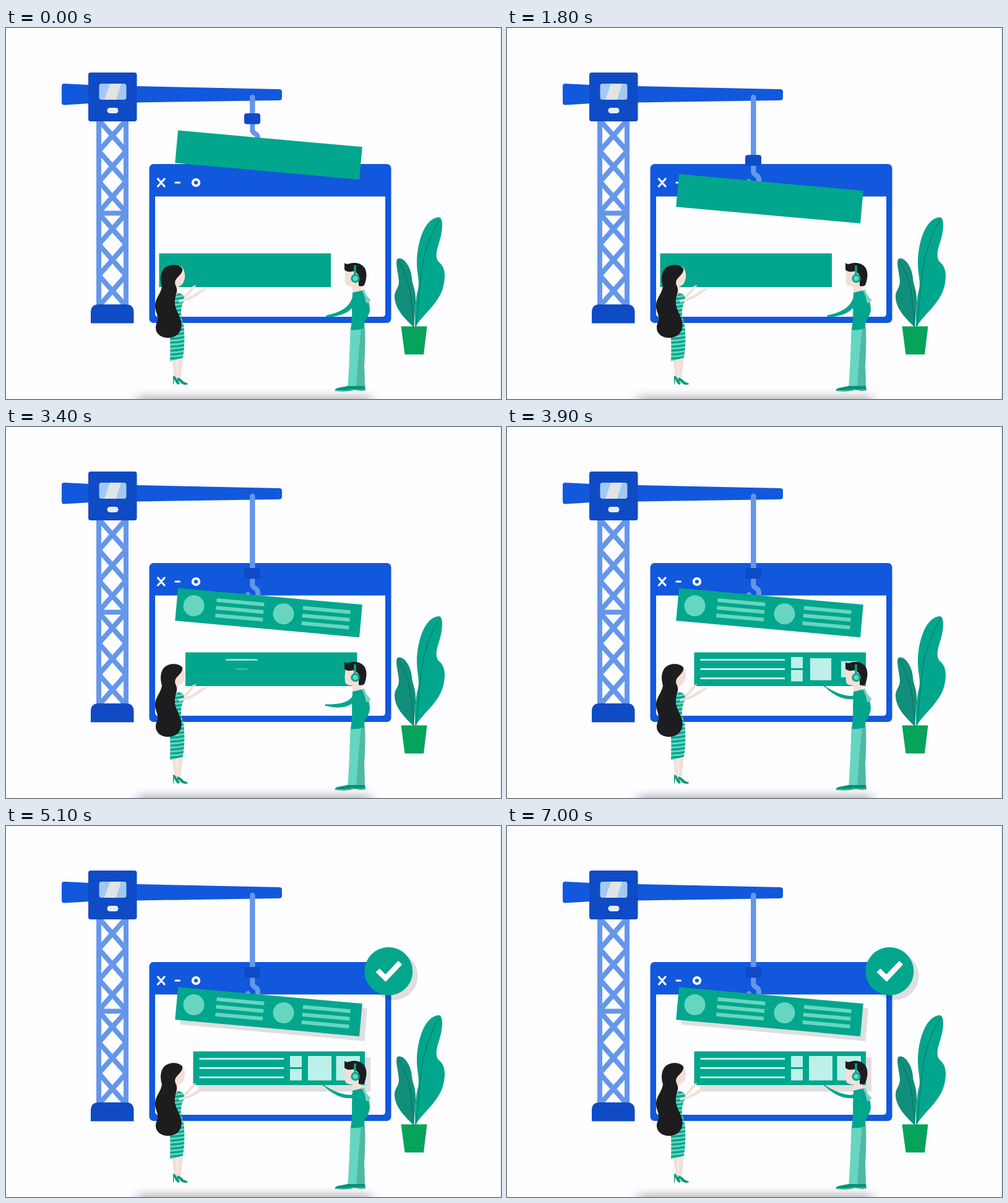
These frames come from a looping animation (800 by 600 pixels, 7100 ms). An HTML page:

```html
<!DOCTYPE html>
<html lang="en">
<head>
<meta charset="utf-8">
<title>Building a page</title>
<style>
  html, body { margin: 0; width: 100%; height: 100%; overflow: hidden; background: #fefdff; }
  svg { display: block; width: 100vw; height: 100vh; }
  .blue { fill: #1158dd; }
  .navy { fill: #0f4bc5; }
  .green { fill: #02a68c; }
  .mint { fill: #66d6c0; }
  .pale { fill: #bdf0e8; }
  .skin { fill: #f3dfd8; }
  .ink { fill: #1d1c1e; }
  .line { fill: none; stroke-linecap: round; stroke-linejoin: round; }
  .shade { fill: #000; fill-opacity: .12; }
</style>
</head>
<body>
<svg viewBox="0 0 800 600" xmlns="http://www.w3.org/2000/svg">
  <defs>
    <filter id="soft" x="-20%" y="-150%" width="140%" height="400%"><feGaussianBlur stdDeviation="9 7"/></filter>
    <clipPath id="dress">
      <path d="M272 429Q281 427 287 433Q289 440 285 447Q282 455 283 465L287 480Q290 505 286 533Q276 536 265 539Q266 520 265 500V470Z"/>
    </clipPath>
    <clipPath id="pane"><rect x="150.5" y="90" width="44" height="26" rx="4"/></clipPath>
  </defs>
  <rect width="800" height="600" fill="#fefdff"/>
  <rect x="212" y="595" width="378" height="22" fill="#777" opacity=".5" filter="url(#soft)"/>
  <rect x="799" width="1" height="600" fill="#e2e1e4"/>

  <!-- tower -->
  <g id="tower" class="line" stroke="#6596ea" stroke-width="8" style="stroke-linecap:butt"></g>
  <path class="navy" d="M137 477.5V460Q137 447 150 447H193.500Q206.500 447 206.500 460V477.5Z"/>
  <path class="blue" d="M94 90L135 92V122L94 124.500Q90 124.500 90 120V94Q90 90 94 90Z"/>
  <path class="blue" d="M210 94L441 99Q446 99 446 103V113Q446 117 441 117L210 120.500Z"/>
  <rect class="navy" x="133" y="72" width="78.5" height="79" rx="4"/>
  <g clip-path="url(#pane)">
    <rect x="150" y="90" width="45" height="26" fill="#a2c9f1"/>
    <path d="M168 90H186L178 116H159Z" fill="#dfe4e7"/>
  </g>
  <rect x="163.500" y="129" width="18" height="9" rx="4.500" fill="#e5effd"/>

  <!-- browser window -->
  <rect class="blue" x="231.500" y="220" width="391" height="257" rx="7"/>
  <path d="M241 272.500H613V462Q613 467 608 467H246Q241 467 241 462Z" fill="#fefdff"/>
  <g class="line" stroke="#fff" stroke-width="3.200">
    <path d="M245.500 244L256 256M256 244L245.500 256M274 250H280.500"/>
    <ellipse cx="307" cy="250" rx="5.200" ry="5" stroke-width="4"/>
  </g>

  <!-- hook, drawn in its lowered place -->
  <path id="cable" class="line" stroke="#6596ea" stroke-width="8.500"/>
  <g id="hook">
    <path class="line" stroke="#6596ea" stroke-width="8" d="M398.300 240V256Q399 259 403 261Q408 264 407 271Q405 281 397 280Q390 279 391 271"/>
    <rect class="navy" x="385" y="228" width="26" height="17.500" rx="4"/>
  </g>

  <g id="banner">
    <rect class="shade fall" x="9" y="7" width="299" height="53"/>
    <rect class="green" width="299" height="53"/>
    <g id="cards"></g>
  </g>

  <rect class="shade fall" x="311.500" y="374" width="277.500" height="55.500"/>
  <rect id="panel" class="green" y="364.500" width="277.500" height="54.500"/>
  <g id="parts"></g>

  <circle class="shade fall" cx="626.500" cy="242.500" r="39"/>
  <g id="badge">
    <circle class="green" cx="618.300" cy="235" r="39"/>
    <path d="M600.500 233.500L613.500 246L637 221" fill="none" stroke="#fff" stroke-width="8.500"/>
  </g>

  <!-- plant -->
  <path fill="#118e7c" d="M659 484C646 471 628 455 628 434C628 424 635 421 635 410C634 395 628 378 633 373C642 369 655 386 656 405C657 418 663 422 662 445Z"/>
  <path class="green" d="M661 484C661 460 661 440 666 422C669 410 664 398 664 380C664 348 676 308 699 306C708 306 706 330 699 350C695 362 694 372 699 378C706 384 709 390 709 402C708 425 700 436 690 449C679 462 670 470 661 484Z"/>
  <path class="line" stroke="#0c6c60" stroke-width=".9" d="M634 375Q653 410 655 440L659 482M701 309Q678 345 671 395L663 482"/>
  <path d="M638.500 482.500H680.500L675 528H644.500Z" fill="#06a35a"/>

  <!-- woman -->
  <path class="skin" d="M268 534H276L277 566L273 569ZM277 533H286L282 568L278 570Z"/>
  <path fill="#0b9a7a" d="M270 562Q274 563 277 569L281 575L278 577Q273 573 272 567L271 577L270 576ZM277 565Q283 567 287 572L294 575Q294 577 289 577Q283 576 279 570L278 577L277 576Z"/>
  <path class="line" stroke="#f3dfd8" stroke-width="4" d="M280 440Q288 436 294 430L303 419"/>
  <path class="line" stroke="#f3dfd8" stroke-width="1.800" d="M301 421L306 416.500"/>
  <g clip-path="url(#dress)">
    <rect class="mint" x="255" y="425" width="40" height="120"/>
    <g id="stripes" stroke="#02a68c" stroke-width="3.300"></g>
  </g>
  <path class="skin" d="M279 440Q294 437 302 432Q312 424 325 419.500Q327 421 317 427Q304 439 280 444Z"/>
  <path class="skin" d="M270 386H284Q290 393 289 404Q287 416 279 418L276 432H266Z"/>
  <path class="ink" d="M285 389C279 381 261 381 254 391C248 400 250 411 252 418C250 431 240 438 241 451C242 462 248 467 244 476C238 489 246 500 259 501C277 502 286 490 283 474C280 462 271 452 273 440C274 430 278 427 275 418C267 404 287 401 285 389Z"/>

  <!-- man -->
  <path class="green" d="M579 428Q588 440 588 457Q586 468 578 476L576 468Q583 460 581 452Z"/>
  <path class="mint" d="M556.500 488L580 484Q581 510 579 545L580 583H552Q555 545 556.500 488Z"/>
  <path fill="#4fb9a4" d="M574 486L580 484Q581 510 579 545L580 583H566Q569 530 574 486Z"/>
  <path fill="#07907a" d="M532 587Q531 583 537 582L552 579H580L581 586Q572 588 563 585Q553 589 532 587Z"/>
  <path d="M533 586Q550 588 562 584M566 585H580" fill="none" stroke="#66d6c0" stroke-width="1"/>
  <path class="skin" d="M549 390Q546 408 549 415Q555 419 560 418V428L574 425V392Z"/>
  <path class="ink" d="M547 380Q550 383 555 381Q570 377 579 387Q586 398 579 416Q575 419 570 417V400L564 393Q551 396 547 391Z"/>
  <path class="green" d="M560 428L577 424Q583 432 584 444Q584 458 580 468L579 485Q567 490 557 488Q560 468 559 452Z"/>
  <path fill="#7fd0bf" d="M575 424L579 423Q582 434 589 439Q589 444 582 445Q580 433 575 424Z"/>
  <path id="arm" class="green"/>
  <path class="line" stroke="#02a68c" stroke-width="3.500" d="M564 384V402" style="stroke-linecap:butt"/>
  <circle class="green" cx="564.500" cy="405" r="7.200"/>
  <circle class="mint" cx="564.500" cy="405" r="4"/>
</svg>
<script>
const LOOP = 7100;
const $ = id => document.getElementById(id);
const clamp = v => Math.max(0, Math.min(1, v));
const out = t => 1 - (1 - t) ** 3;
const inOut = t => t < .5 ? 4 * t ** 3 : 1 - (2 - 2 * t) ** 3 / 2;
const quad = t => t < .5 ? 2 * t * t : 1 - 2 * (1 - t) ** 2;
const span = (t, start, length, ease) => ease(clamp((t - start) / length));
const mix = (a, b, k) => a + (b - a) * k;

// Shapes that grow from their middle, each with its start and length in ms.
const pops = [];

function add(parent, tag, attrs) {
  const el = document.createElementNS("http://www.w3.org/2000/svg", tag);
  for (const key in attrs) el.setAttribute(key, attrs[key]);
  $(parent).append(el);
  return el;
}

function popRect(parent, kind, x, y, w, h, start, length, wide) {
  const el = add(parent, "rect", { class: kind, x, y, width: w, height: h });
  pops.push({ el, cx: x + w / 2, cy: y + h / 2, start, length, wide });
}

function popDot(cx, start) {
  const el = add("cards", "circle", { class: "mint", cx, cy: 26.2, r: 17 });
  pops.push({ el, cx, cy: 26.2, start, length: 300 });
}

function build() {
  let d = "M150 151V448M194 151V448M150 299.5H194";
  for (const y of [149, 199, 248, 300, 350, 400])
    d += `M150 ${y}L194 ${y + 50}M194 ${y}L150 ${y + 50}`;
  add("tower", "path", { d });

  for (let y = 430; y < 545; y += 6.4)
    add("stripes", "path", { d: `M255 ${y + 2}Q275 ${y + 3} 295 ${y - 2}`, fill: "none" });

  [[28, 64, 2100, 2250], [173.5, 204, 2620, 2750]].forEach(([dot, x, first, rows]) => {
    popDot(dot, first);
    for (let i = 0; i < 3; i++)
      popRect("cards", "mint", x, 10.8 + 12.4 * i, 77, 6, rows + 80 * i, 400, true);
  });

  for (let i = 0; i < 3; i++)
    popRect("parts", "pale", 312.5, 375 + 15 * i, 136.5, 3, 3343 + 39 * i, 400, true);
  [[459, 372, 19, 18], [459, 393, 19, 18.5], [488, 372, 38, 39.5], [533.5, 372, 38.5, 39.5]]
    .forEach((box, i) => popRect("parts", "pale", ...box, 3600 + 70 * i, 300));

  pops.push({ el: $("badge"), cx: 618.3, cy: 235, start: 3950, length: 350 });
}

function grow(p, t) {
  const k = span(t, p.start, p.length, out);
  p.el.setAttribute("transform",
    `translate(${p.cx} ${p.cy}) scale(${k} ${p.wide ? 1 : k}) translate(${-p.cx} ${-p.cy})`);
  p.el.setAttribute("opacity", Math.min(1, k * 2));
}

function drawArm(k) {
  const hx = mix(518, 512.5, k), hy = mix(466, 419.5, k);
  const ex = mix(551, 537, k), ey = mix(461, 438, k);
  const sy = mix(437, 434, k);
  $("arm").setAttribute("d",
    `M563 427Q560 ${sy} 558 ${mix(440, 435, k)}Q${ex} ${ey - 3} ${hx} ${hy - 1.5}` +
    `Q${hx - 2} ${hy + 1} ${hx + 2} ${hy + 1.5}Q${ex} ${ey + 5} 562 ${mix(449, 440, k)}L572 432Z`);
}

function draw(t) {
  const lift = 1 - span(t, 1200, 1000, inOut);
  $("cable").setAttribute("d", `M398.300 112V${232 - 90 * lift}`);
  $("hook").setAttribute("transform", `translate(0 ${-90 * lift})`);
  $("banner").setAttribute("transform", `translate(278 ${260.5 - 95 * lift}) rotate(5.15)`);
  $("panel").setAttribute("x", mix(247.5, 302.5, span(t, 2909, 800, inOut)));
  drawArm(span(t, 3150, 600, quad));
  pops.forEach(p => grow(p, t));
  const shade = span(t, 4500, 400, quad);
  document.querySelectorAll(".fall").forEach(el => el.setAttribute("opacity", shade));
}

build();
const begin = performance.now();
function tick() {
  draw((performance.now() - begin) % LOOP);
  requestAnimationFrame(tick);
}
tick();
</script>
</body>
</html>
```
